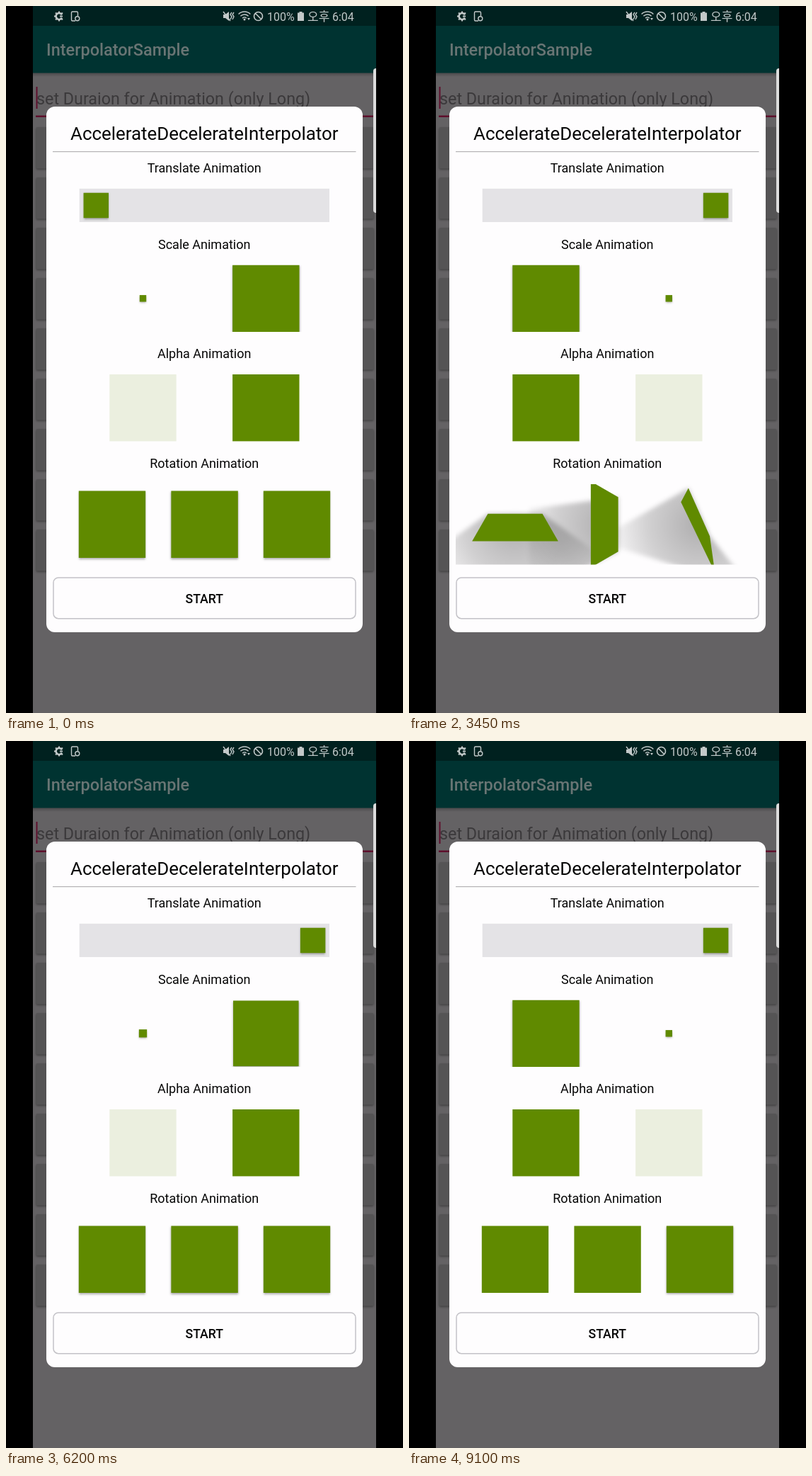
Animation, 561 px wide and 998 px high, one loop 9.15 s. Source, as an HTML page with a canvas:

```html
<!DOCTYPE html>
<html lang="en">
<head>
<meta charset="utf-8">
<title>Interpolator sample</title>
<style>
  html, body { margin: 0; width: 100%; height: 100%; overflow: hidden; background: #000; }
  canvas { display: block; }
</style>
</head>
<body>
<canvas id="stage" width="561" height="998"></canvas>
<script>
const ctx = document.getElementById('stage').getContext('2d');

const LOOP = 9150, TICK = 50, PHASE = 1000;
const RUNS = [{ reset: 0, start: 32 }, { reset: 5080, start: 5105 }];
const GREEN = '#608a00', PAPER = '#fefdfe', ICON = '#c3c9c9';
const SIZE = 94.4, HALF = SIZE / 2, CAMERA = 194;
const LEFT = 193.5, RIGHT = 367.3;

const clamp = v => Math.min(1, Math.max(0, v));
const ease = v => 0.5 - Math.cos(Math.PI * clamp(v)) / 2;

function box(x, y, w, h, color) {
  ctx.fillStyle = color;
  ctx.fillRect(x, y, w, h);
}

function roundBox(x, y, w, h, r) {
  ctx.beginPath();
  ctx.roundRect(x, y, w, h, r);
}

function text(str, x, y, size, color, weight = 400, align = 'left') {
  ctx.font = `${weight} ${size}px Roboto, "Noto Sans CJK KR", "Noto Sans CJK", sans-serif`;
  ctx.textAlign = align;
  ctx.fillStyle = color;
  ctx.fillText(str, x, y);
}

function path(points) {
  ctx.beginPath();
  points.forEach(p => ctx.lineTo(p[0], p[1]));
  ctx.closePath();
}

function clipped(x, y, w, h, draw) {
  ctx.save();
  ctx.beginPath();
  ctx.rect(x, y, w, h);
  ctx.clip();
  draw();
  ctx.restore();
}

function withShadow(strength, draw) {
  ctx.save();
  ctx.shadowColor = `rgba(0,0,0,${0.35 * strength})`;
  ctx.shadowBlur = 3;
  ctx.shadowOffsetY = 1.5;
  draw();
  ctx.restore();
}

function square(cx, cy, size, shadow = 1) {
  withShadow(shadow, () => box(cx - size / 2, cy - size / 2, size, size, GREEN));
}

function statusBar() {
  box(38, 0, 485, 28, '#00211f');
  ctx.strokeStyle = ctx.fillStyle = ICON;
  ctx.lineWidth = 2.6;
  ctx.beginPath();
  ctx.arc(75, 14.5, 4.4, 0.5, 5.8);
  ctx.stroke();
  for (let i = 1; i < 8; i++) {
    const a = i * Math.PI / 4;
    ctx.fillRect(75 + 6 * Math.cos(a) - 1, 14.5 + 6 * Math.sin(a) - 1, 2, 2);
  }
  ctx.fillRect(76, 13.5, 4, 2);

  ctx.lineWidth = 1.4;
  roundBox(92.5, 8, 9, 13, 1.5);
  ctx.stroke();
  box(98, 14, 7, 8, '#00211f');
  ctx.beginPath();
  ctx.arc(100.8, 17.7, 3, 0, 7);
  ctx.stroke();

  ctx.fillStyle = ICON;
  path([[307, 12], [310, 12], [315, 8], [315, 21], [310, 17], [307, 17]]);
  ctx.fill();
  ctx.beginPath();
  ctx.moveTo(307, 8); ctx.lineTo(317, 21);
  ctx.moveTo(319, 9); ctx.lineTo(317, 12); ctx.lineTo(319, 15); ctx.lineTo(317, 19);
  ctx.moveTo(322, 9); ctx.lineTo(320, 12); ctx.lineTo(322, 15); ctx.lineTo(320, 19);
  ctx.stroke();

  for (const r of [4, 8, 12]) {
    ctx.beginPath();
    ctx.arc(337, 20, r, -2.35, -0.8);
    ctx.stroke();
  }
  ctx.beginPath();
  ctx.arc(337, 19, 1.5, 0, 7);
  ctx.fill();
  path([[341, 17], [345, 17], [343, 20]]);
  ctx.fill();

  ctx.lineWidth = 1.6;
  ctx.beginPath();
  ctx.arc(356.5, 14.5, 6, 0, 7);
  ctx.moveTo(352.3, 10.3); ctx.lineTo(360.7, 18.7);
  ctx.stroke();

  text('100%', 369, 20.5, 16, ICON);
  box(412, 9.5, 9, 11.5, ICON);
  box(414.5, 8, 4, 2, ICON);
  text('오후', 426, 20.5, 17, ICON);
  text('6:04', 461, 20.5, 16, ICON);
}

function screen() {
  box(0, 0, 561, 998, '#000');
  box(38, 0, 485, 998, '#646264');
  const fade = ctx.createLinearGradient(0, 94, 0, 100);
  fade.addColorStop(0, '#494849');
  fade.addColorStop(1, '#646264');
  box(38, 94, 485, 6, fade);
  box(38, 28, 485, 66.5, '#003331');
  statusBar();
  text('InterpolatorSample', 57, 70, 23.5, '#697574', 500);

  text('set Duraion for Animation (only Long)', 43, 138.5, 23.3, '#3b393b');
  box(42.5, 114, 2, 31, '#5e0f2c');
  box(42, 154.5, 477, 2.5, '#5e0f2c');
  for (let y = 171; y < 800; y += 71) {
    withShadow(1, () => {
      ctx.fillStyle = '#555455';
      roundBox(42.5, y, 477, 58.5, 2);
      ctx.fill();
    });
  }
  ctx.fillStyle = '#dcdcdc';
  roundBox(519, 88, 4, 204, [4, 0, 0, 4]);
  ctx.fill();
}

function dialog() {
  ctx.fillStyle = PAPER;
  roundBox(57, 142, 447, 742, 12);
  ctx.fill();
  text('AccelerateDecelerateInterpolator', 280.3, 188.5, 25.9, '#060606', 400, 'center');
  box(66, 205, 428.5, 1.2, '#b4b2b5');
  const labels = { Translate: 234.5, Scale: 342.5, Alpha: 497.2, Rotation: 652 };
  for (const name in labels) {
    text(name + ' Animation', 280.2, labels[name], 18, '#060606', 400, 'center');
  }
  box(103.7, 257.8, 353.3, 47.2, '#e4e3e6');
  ctx.strokeStyle = '#c3c2c7';
  ctx.lineWidth = 1.5;
  roundBox(67, 807, 427, 57.7, 7);
  ctx.stroke();
  text('START', 280.3, 842.8, 17.7, '#060606', 500, 'center');
}

// Corners of a square turned about Y, then X, and seen in perspective: [x, y, depth].
function turnedCorners(cx, cy, rx, ry) {
  return [[-1, -1], [1, -1], [1, 1], [-1, 1]].map(([sx, sy]) => {
    const x = sx * HALF * Math.cos(ry), depth = -sx * HALF * Math.sin(ry);
    const y = sy * HALF * Math.cos(rx) - depth * Math.sin(rx);
    const z = sy * HALF * Math.sin(rx) + depth * Math.cos(rx);
    const zoom = CAMERA / (CAMERA - z);
    return [cx + x * zoom, cy + y * zoom, z];
  });
}

function castShadow(cx, cy, corners, lift) {
  const shade = ctx.createRadialGradient(cx, cy, 10, cx, cy, 135);
  shade.addColorStop(0, `rgba(0,0,0,${0.32 * lift})`);
  shade.addColorStop(0.5, `rgba(0,0,0,${0.19 * lift})`);
  shade.addColorStop(1, 'rgba(0,0,0,0)');
  ctx.save();
  ctx.filter = 'blur(3px)';
  ctx.fillStyle = shade;
  path(corners.map(([x, y, z]) => {
    const rise = Math.max(0, z);
    return [x + Math.sign(x - cx) * rise * 2, y + rise * 0.9];
  }));
  ctx.fill();
  ctx.restore();
}

function rotations(p) {
  const angle = Math.PI * p, lift = Math.sin(angle), cy = 731.8;
  const cards = [[150, 1, 0], [280.6, 0, 1], [411, 1, 1]].map(([cx, kx, ky]) => ({
    cx,
    corners: turnedCorners(cx, cy, kx * angle, ky * angle),
    shadow: p < 0.5 || (kx && ky) ? clamp(1 - lift * 2) : 0
  }));
  clipped(66, 675, 428.5, 113.5, () => {
    if (lift > 0.01) cards.forEach(c => castShadow(c.cx, cy, c.corners, lift));
    for (const card of cards) {
      withShadow(card.shadow, () => {
        ctx.fillStyle = GREEN;
        path(card.corners);
        ctx.fill();
      });
    }
  });
}

function draw(time) {
  const run = time >= RUNS[1].reset ? RUNS[1] : RUNS[0];
  const [move, scale, alpha, turn] =
    [0, 1, 2, 3].map(i => ease((time - run.start) / PHASE - i));

  screen();
  dialog();
  square(127.3 + 306.3 * move, 281.5, 35.5);

  const grow = 0.1 + 0.9 * scale, shrink = 1 - 0.9 * scale;
  clipped(120, 365.6, 330, SIZE, () => {
    square(LEFT, 412.8, SIZE * grow);
    square(RIGHT, 412.8, SIZE * shrink);
  });

  ctx.globalAlpha = 0.12 + 0.88 * alpha;
  square(LEFT, 567.2, SIZE, 0);
  ctx.globalAlpha = 1 - 0.88 * alpha;
  square(RIGHT, 567.2, SIZE, 0);
  ctx.globalAlpha = 1;

  rotations(turn);
}

const began = performance.now();
function frame() {
  const elapsed = (performance.now() - began) % LOOP;
  draw(Math.floor(elapsed / TICK) * TICK);
  requestAnimationFrame(frame);
}
frame();
</script>
</body>
</html>
```
